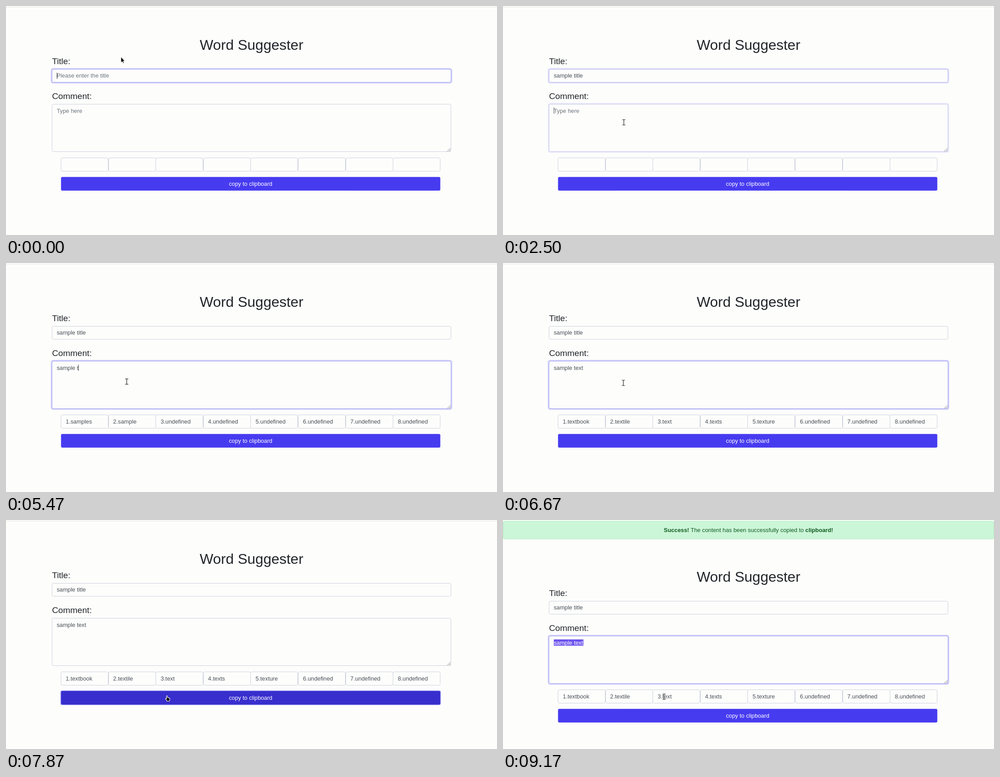
Recreate the animation shown at these times as an HTML page. Size 1093 by 512 pixels, loop 9.21 s.

```html
<!DOCTYPE html>
<html lang="en">
<head>
<meta charset="utf-8">
<title>Word Suggester</title>
<style>
  html, body { margin: 0; width: 100%; height: 100%; overflow: hidden; background: #fdfdfc; }
  svg { display: block; }
  text { font: 12.8px "Liberation Sans", Arial, sans-serif; fill: #495057; white-space: pre; }
  .h1 { font-size: 32px; fill: #212529; }
  .h5 { font-size: 19.2px; fill: #212529; }
  .mid { text-anchor: middle; }
  .box { fill: none; stroke: #cdd0dc; }
  .ring { fill: none; stroke: #d0cdfa; stroke-width: 2.6; }
  .focus { fill: none; stroke: #a5aaf2; }
</style>
</head>
<body>
<svg width="1093" height="512" viewBox="0 0 1093 512">
  <path id="line" d="M0 2.5H1093" stroke="#e6e6dc"/>
  <g id="alert">
    <rect x=".5" y="2.5" width="1092" height="40" rx="3" fill="#ccf6d8" stroke="#b5ebc4"/>
    <text class="mid" x="546.5" y="27" style="fill:#115c22"><tspan font-weight="bold">Success!</tspan> The content has been successfully copied to <tspan font-weight="bold">clipboard!</tspan></text>
  </g>
  <g id="page">
    <text class="h1 mid" x="546.5" y="98">Word Suggester</text>
    <text class="h5" x="102.5" y="130">Title:</text>
    <text class="h5" x="102.5" y="208">Comment:</text>
    <rect class="box" x="102.5" y="141.5" width="888" height="29" rx="3"/>
    <g id="titleFocus">
      <rect class="ring" x="101" y="140" width="891" height="32" rx="4"/>
      <rect class="focus" x="102.5" y="141.5" width="888" height="29" rx="3"/>
    </g>
    <rect class="box" x="102.5" y="219.5" width="888" height="106" rx="3"/>
    <g id="noteFocus">
      <rect class="ring" x="101" y="218" width="891" height="109" rx="4"/>
      <rect class="focus" x="102.5" y="219.5" width="888" height="106" rx="3"/>
    </g>
    <path d="M982.5 325l7-7M986.5 325l3-3" stroke="#777"/>
    <rect id="selection" x="113" y="227" width="66" height="14" fill="#6c53ee"/>
    <text id="title" x="112.9" y="160"></text>
    <text id="note" x="112.9" y="239"></text>
    <rect id="caret" width="1" height="14" fill="#444"/>
    <g id="cells"></g>
    <rect id="ring" x="121" y="381" width="847" height="33" rx="4" fill="#b1b3f8"/>
    <rect id="button" x="122.5" y="382.3" width="844.3" height="30.4" rx="3"/>
    <text class="mid" x="544.5" y="402" style="fill:#fff">copy to clipboard</text>
  </g>
  <g id="arrow"><path d="M0 0V12.5L2.9 9.9L4.8 14.2L6.6 13.4L4.7 9.2H8.4Z" fill="#000" stroke="#fff" stroke-width=".8"/></g>
  <g id="beam" fill="none">
    <path d="M-3.5-6H-1Q0-6 0-5Q0-6 1-6H3.5M0-5V5M-3.5 6H-1Q0 6 0 5Q0 6 1 6H3.5" stroke="#fff" stroke-width="2.6"/>
    <path d="M-3.5-6H-1Q0-6 0-5Q0-6 1-6H3.5M0-5V5M-3.5 6H-1Q0 6 0 5Q0 6 1 6H3.5" stroke="#222" stroke-width="1.2"/>
  </g>
  <g id="hand"><path d="M-1-2Q.5-3 1 0L1.2 2L5 2.8Q6.5 3 6.3 5L5.6 8V10H-.6V8L-3.6 4.8Q-3.6 3.4-2 3.8L-1 4.5Z" fill="#000" stroke="#fff" stroke-width="1.1"/></g>
</svg>
<script>
const LOOP = 9210, TO_NOTE = 2440, PRESS = 7700, COPIED = 7960, SHIFT = 40;
const $ = id => document.getElementById(id);
const show = (id, on) => $(id).style.display = on ? '' : 'none';
const clamp = v => Math.max(0, Math.min(1, v));
const smooth = v => v * v * (3 - 2 * v);
const fade = (t, start) => smooth(clamp((t - start) / 150));

// time, x, y of the pointer
const path = [
  [0, 256, 114], [150, 256, 114], [900, 272, 166], [1300, 272, 170], [2130, 272, 170],
  [2420, 269, 260], [4300, 269.5, 262], [6600, 268, 268], [6850, 268, 268],
  [7400, 358, 396], [7960, 358.5, 395], [LOOP, 358.5, 395]
];
// text, start, ms per key
const typing = {
  title: ['sample title', 1500, 55],
  sample: ['sample', 3100, 160],
  text: [' text', 5060, 210]
};
const pad = words => Array.from({length: 8}, (_, i) => `${i + 1}.${words[i]}`);
const lists = {
  none: Array(8).fill(''),
  sample: pad(['samples', 'sample']),
  text: pad(['textbook', 'textile', 'text', 'texts', 'texture'])
};

for (let i = 0; i < 8; i++) {
  const x = 122.5 + 105.6 * i;
  $('cells').innerHTML += `<rect class="box" x="${Math.floor(x) + .5}" y="339.5" width="105" height="30" rx="3"/>` +
    `<text x="${x + 10.5}" y="359"></text>`;
}
const cellTexts = [...$('cells').querySelectorAll('text')];

function typed(key, t) {
  const [text, start, step] = typing[key];
  return text.slice(0, Math.max(0, Math.floor((t - start) / step) + 1));
}

function lastKey(t, keys, from) {
  for (const key of keys) {
    const [text, start, step] = typing[key];
    if (t >= start) from = start + step * Math.min(text.length - 1, Math.floor((t - start) / step));
  }
  return from;
}

function pointer(t) {
  const i = path.findIndex(p => p[0] > t), [a, b] = [path[i - 1], path[i]];
  const k = smooth((t - a[0]) / (b[0] - a[0]));
  return [1, 2].map(n => a[n] + (b[n] - a[n]) * k);
}

function setField(id, value, hint, selected) {
  $(id).textContent = value || hint;
  $(id).style.fill = selected ? '#fff' : value ? '#495057' : '#6c757d';
}

function draw(t) {
  const copied = t >= COPIED, shift = copied ? SHIFT : 0;
  const title = typed('title', t), note = typed('sample', t) + typed('text', t);
  show('alert', copied);
  show('line', !copied);
  show('selection', copied);
  $('page').setAttribute('transform', `translate(0 ${shift})`);
  setField('title', title, 'Please enter the title');
  setField('note', note, 'Type here', copied);

  const list = note.length > 9 ? lists.text : note.length > 4 ? lists.sample : lists.none;
  cellTexts.forEach((cell, i) => cell.textContent = list[i]);

  const inTitle = t < TO_NOTE;
  const since = inTitle ? lastKey(t, ['title'], 0) : lastKey(t, ['sample', 'text'], TO_NOTE);
  show('caret', t < PRESS && (t - since) % 1000 < 500);
  const width = (inTitle ? title : note) ? $(inTitle ? 'title' : 'note').getComputedTextLength() : 0;
  $('caret').setAttribute('x', Math.round(112.9 + width));
  $('caret').setAttribute('y', inTitle ? 149 : 227);

  $('titleFocus').style.opacity = 1 - fade(t, TO_NOTE);
  $('noteFocus').style.opacity = fade(t, TO_NOTE) - fade(t, PRESS) + fade(t, COPIED);
  $('ring').style.opacity = fade(t, PRESS) - fade(t, COPIED);
  const dark = fade(t, 7310) - fade(t, COPIED);
  const mix = (a, b) => Math.round(a + (b - a) * dark);
  $('button').setAttribute('fill', `rgb(${mix(71, 56)},${mix(59, 46)},${mix(240, 205)})`);

  const [x, y] = pointer(t), py = y - shift;
  const within = (top, bottom) => py >= top && py <= bottom;
  const kind = within(382, 413) ? 'hand'
    : within(141, 171) || within(219, 326) || within(339, 370) ? 'beam' : 'arrow';
  for (const id of ['arrow', 'beam', 'hand']) show(id, id === kind);
  $(kind).setAttribute('transform', `translate(${x} ${y})`);
}

function frame() {
  draw(performance.now() % LOOP);
  requestAnimationFrame(frame);
}
frame();
</script>
</body>
</html>
```
